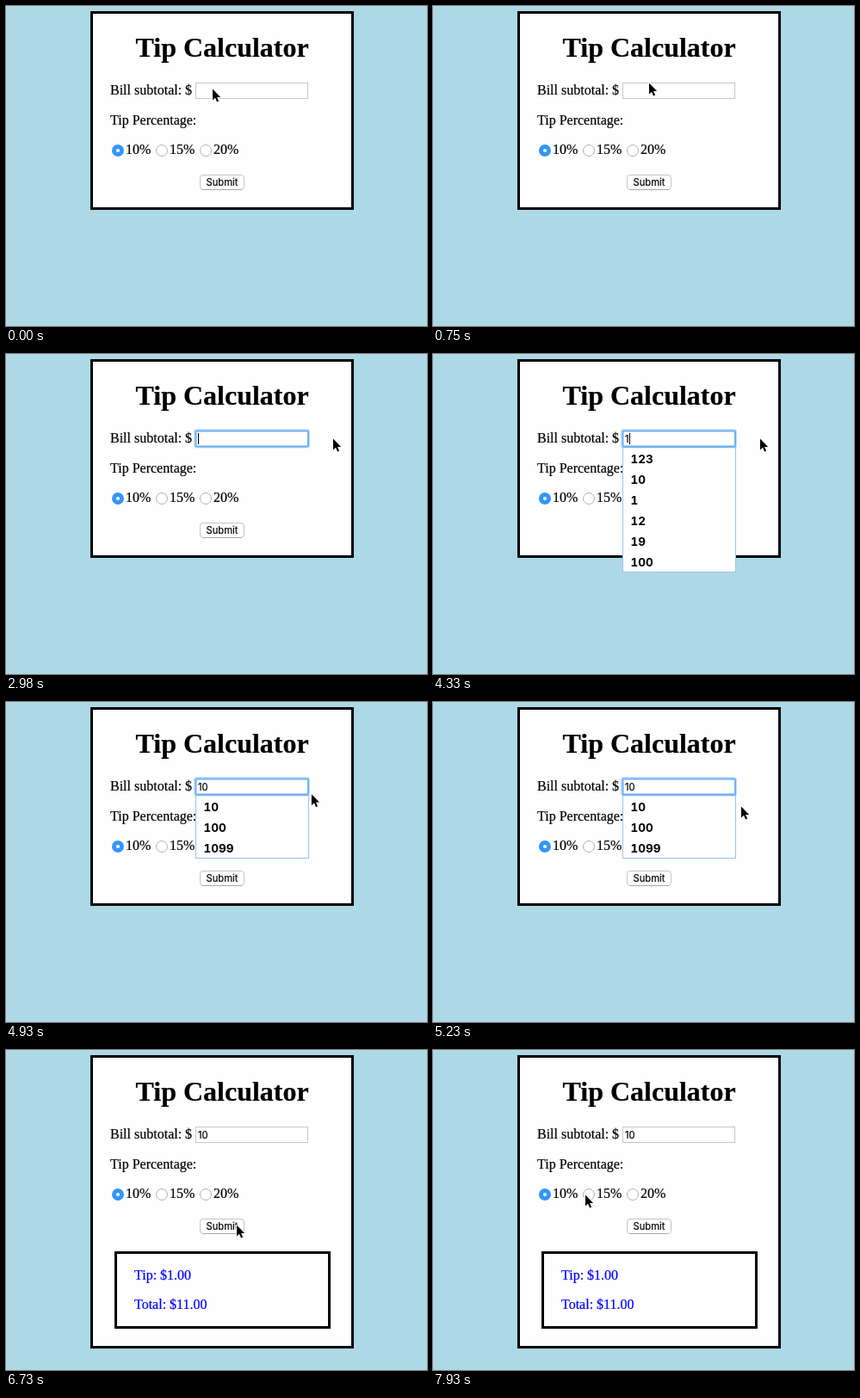
These frames come from a looping animation (489x372 px, 8 s). An HTML page:

```html
<!DOCTYPE html>
<html lang="en">
<head>
<meta charset="utf-8">
<title>Tip Calculator</title>
<style>
  html, body { margin: 0; width: 100%; height: 100%; overflow: hidden; background: #add8e6; }
  svg { display: block; }
  text { font: 16px "Liberation Serif", serif; white-space: pre; stroke: #000; stroke-width: .2; }
  .title { font-size: 32px; font-weight: bold; }
  .ui { font: 11.2px Inter, sans-serif; }
  .item { font: bold 13.5px Inter, sans-serif; font-feature-settings: "tnum"; stroke: none; }
  .blue { fill: #00f; stroke: #00f; }
  .frame { fill: #fefefe; stroke: #000; stroke-width: 3; }
</style>
</head>
<body>
<svg width="489" height="372" viewBox="0 0 489 372">
  <rect id="form" class="frame" x="99.5" y="7.5" width="303" height="228"/>
  <text class="title" x="150.5" y="59">Tip Calculator</text>
  <text x="121" y="103">Bill subtotal: $</text>
  <text x="121" y="138">Tip Percentage:</text>
  <g id="radios"></g>

  <rect x="225.5" y="196.5" width="51" height="17" rx="3.5" fill="#fff" stroke="#c4c4c4"/>
  <path d="M228.5 213.5h45" stroke="#a9a9a9"/>
  <text class="ui" x="251" y="209" text-anchor="middle">Submit</text>

  <g id="result">
    <rect class="frame" x="127.5" y="235.5" width="248" height="87"/>
    <text class="blue" x="149" y="267">Tip: $1.00</text>
    <text class="blue" x="149" y="301">Total: $11.00</text>
  </g>

  <rect id="field" x="220.5" y="89.5" width="130" height="18" stroke="#c8c8c8"/>
  <g id="list">
    <rect id="panel" x="220.5" y="108.5" width="131" fill="#fff" stroke="#9dc3e6"/>
    <rect id="hover" x="221" y="110" width="130" height="24" fill="#cdcdcd"/>
    <g id="items"></g>
  </g>
  <g id="ring" fill="none" stroke="#70b1f6">
    <rect x="219.5" y="88.5" width="132" height="19.5" rx="1.5" stroke-width="3" opacity=".4"/>
    <rect x="220.5" y="89.5" width="130.5" height="18" rx="1" stroke-width="2"/>
  </g>
  <text id="value" class="ui" x="223" y="103"></text>
  <rect id="caret" y="92" width="1" height="13"/>

  <path id="cursor" d="M.5 1V14L3.5 11.2L5.6 16L7.6 15.1L5.5 10.4H9.6Z"
        stroke="#fff" stroke-width="1.8" stroke-linejoin="round" paint-order="stroke"/>
</svg>
<script>
const LOOP = 8000, TICK = 150;
const FOCUS = 1040, TYPE = 4330, BLUR = 5830, SUBMIT = 6730;
const $ = id => document.getElementById(id);
const show = (id, on) => $(id).style.display = on ? "" : "none";
const within = (t, a, b) => t >= a && t < b;

// Pointer strokes: first and last step time, end point, optional bend point
const rest = [239.5, 95.5];
const strokes = [
  { from: 450, to: 750, end: [250.5, 88.5] },
  { from: 1340, to: 1630, end: [379.5, 97.5] },
  { from: 4930, to: 5230, end: [357.5, 120.5], bend: [318, 116] },
  { from: 5380, to: 5530, end: [377.5, 119.5] },
  { from: 5830, to: 6430, end: [267.5, 202.5] },
  { from: 7330, to: 7930, end: [176.5, 167.5], bend: [205, 134] }
];
const history = ["123", "10", "1", "12", "19", "100", "1099"];

function pointer(t) {
  let pos = rest;
  for (const { from, to, end, bend } of strokes) {
    if (t < from) break;
    const gaps = Math.round((to - from) / TICK);
    const step = Math.min(gaps, Math.floor((t - from) / (to - from) * gaps + 1e-6));
    const p = (step + 1) / (gaps + 1);
    const e = p * p * (3 - 2 * p);
    pos = pos.map((a, i) => {
      const b = bend ? bend[i] : (a + end[i]) / 2;
      return (1 - e) ** 2 * a + 2 * e * (1 - e) * b + e * e * end[i];
    });
  }
  return pos;
}

function caretLit(t) {
  const tick = t - (t - TYPE) % TICK - (t < TYPE && (t - TYPE) % TICK ? TICK : 0);
  const start = t < TYPE ? FOCUS - 80 : TYPE + 90;
  return (tick - start) % 1000 < 500;
}

$("radios").innerHTML = [10, 15, 20].map((pct, i) => {
  const x = 130 + 51 * i;
  const mark = i
    ? `<circle cx="${x}" cy="168" r="6.5" fill="#fff" stroke="#b2b2b2"/>`
    : `<circle cx="${x}" cy="168" r="7" fill="#3296fb"/><circle cx="${x}" cy="168" r="2.1" fill="#fff"/>`;
  return `${mark}<text x="${x + 9}" y="172">${pct}%</text>`;
}).join("");

let typed;
function setValue(text) {
  if (text === typed) return;
  typed = text;
  const rows = history.filter(h => h.startsWith(text)).slice(0, 6);
  $("value").textContent = text;
  $("caret").setAttribute("x", 223 + Math.round($("value").getComputedTextLength()));
  $("panel").setAttribute("height", 24 * rows.length + 1);
  $("items").innerHTML = rows.map((n, i) =>
    `<text class="item" x="229.5" y="${127 + 24 * i}">${n}</text>`).join("");
}

function draw() {
  const t = performance.now() % LOOP;
  const [x, y] = pointer(t);
  const focused = within(t, FOCUS, BLUR);
  const open = within(t, TYPE, BLUR);
  const hovering = open && x < 351 && within(y, 110, 134);
  const done = t >= SUBMIT;

  setValue("10".slice(0, t < TYPE ? 0 : t < TYPE + TICK ? 1 : 2));
  show("ring", focused);
  show("list", open);
  show("hover", hovering);
  show("caret", focused && caretLit(t));
  show("result", done);
  $("field").setAttribute("fill", hovering ? "#faffbd" : "#fff");
  $("form").setAttribute("height", done ? 338 : 228);
  $("cursor").setAttribute("transform", `translate(${x} ${y})`);
  requestAnimationFrame(draw);
}
draw();
</script>
</body>
</html>
```
